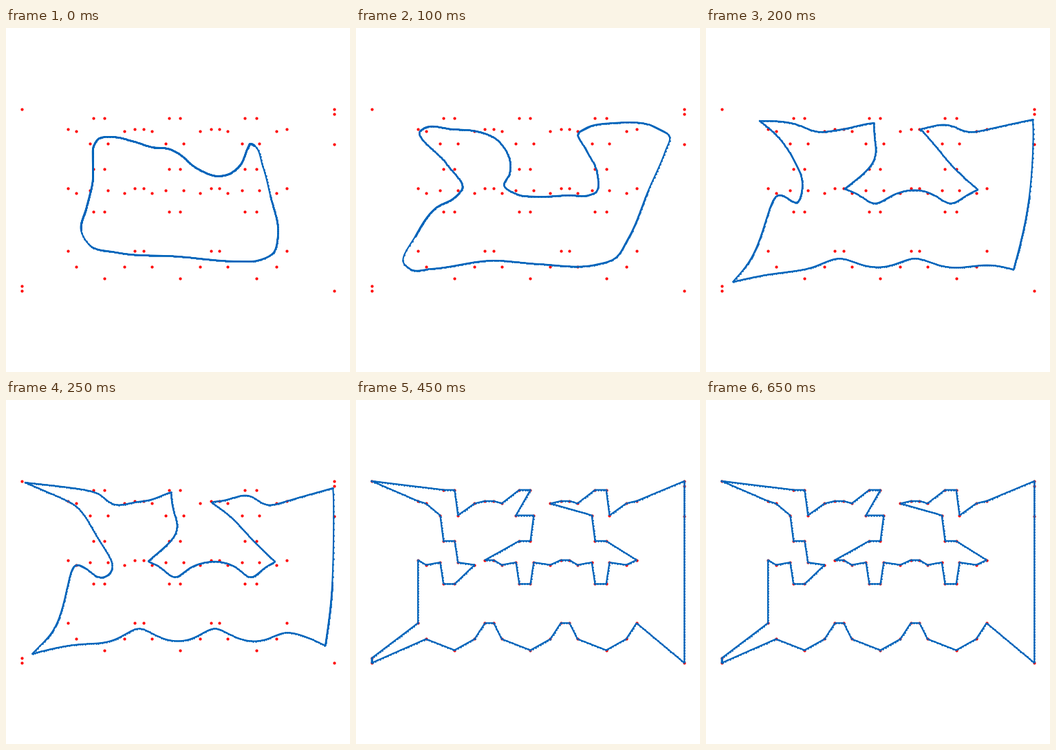
These frames come from a looping animation (500 by 500 pixels, 1.65 s). A matplotlib script:

```python
import numpy as np
import matplotlib.pyplot as plt
from matplotlib.animation import FuncAnimation

STEP_MS, FRAMES = 50, 33
PITCH = 110.16          # spacing of the three repeated city blocks
LEFT, RIGHT = 22.7, 477.3
TOP, BOTTOM = 117.8, 382.2
SUB = 32                # samples between neighbouring ring points

# One block of cities, keyed by letter.
COLS = [90, 101.6, 122.3, 127.1, 143.3, 148.1, 172.3, 187.4]
TOP_Y = [146.8, 150.3, 167.6, 130.6]
MID_Y = [232.6, 239.6, 236, 267.4]
LOW_Y = [324.2, 347.4, 363.6]
BLOCK = dict(zip("abcdefgh", zip(COLS, TOP_Y + [TOP_Y[i] for i in (3, 2, 1, 0)])))
BLOCK.update(zip("klmnopqr", zip(COLS, MID_Y + [MID_Y[i] for i in (3, 2, 1, 0)])))
BLOCK.update(zip("stuvw", zip([COLS[i] for i in (0, 1, 4, 6, 7)], LOW_Y + LOW_Y[1::-1])))
BLOCK.update(zip("ij", ((x, 204.8) for x in COLS[3:5])))

TR, R2, R3, BR = [(RIGHT, y) for y in (TOP, 124.8, 168.8, BOTTOM)]
TL, L2, BL = [(LEFT, y) for y in (TOP, 375.2, BOTTOM)]


def block(k, keys):
    """Cities of block k in the given order."""
    return [(BLOCK[c][0] + k * PITCH, BLOCK[c][1]) for c in keys]


# The ring is split into sections that correspond from pose to pose.
tour = [
    [TL] + block(0, "defgh") + block(1, "abd"),
    block(1, "ecfji"),
    block(0, "r") + block(1, "klmnopqr") + block(2, "klmnopq"),
    block(2, "rjic"),
    block(1, "gh") + block(2, "abdefgh"),
    [TR, R2],
    [R3],
    [BR] + block(2, "wvuts") + block(1, "wvuts") + block(0, "wvut"),
    [BL],
    [L2] + block(0, "s"),
    block(0, "klmno"),
    block(0, "qpjicba"),
]
cities = sum(tour, [])
PINNED = {0, 1, 2, 3, 4, 5, 7, 8}   # sections that start with a sharp corner

blob = [
    [(127, 172), (134, 161), (152, 158), (183, 164)],
    [(212, 173), (238, 176)],
    [(250, 182), (276, 203), (310, 215)],
    [(324, 212), (341, 198)],
    [(351, 175), (355, 168)],
    [(361, 171), (373, 200)],
    [(384, 243), (395, 303)],
    [(389, 326), (365, 338), (340, 339), (250, 332), (160, 326)],
    [(122, 316)],
    [(109, 294)],
    [(117, 260)],
    [(126, 220), (126, 190)],
]

fold = [
    [(94, 149), (98, 146), (140, 147), (183, 152)],
    [(203, 161), (224, 196), (223, 212)],
    [(215, 228), (235, 242), (260, 245), (310, 243), (338, 243)],
    [(348, 239), (350, 209), (333, 175)],
    [(323, 153), (333, 146), (375, 138), (435, 144)],
    [(456, 159), (450, 178)],
    [(425, 236), (396, 305)],
    [(376, 335), (348, 344), (265, 343), (198, 338), (110, 350), (80, 351)],
    [(70, 343)],
    [(86, 303)],
    [(118, 260), (141, 248)],
    [(154, 234), (132, 198)],
]

# Section starts of the smoothed tours; None keeps the city itself.
fins = [(78, 135), (244, 138), (201, 234), (395, 235), (314, 149), (475, 133),
        (476, 255), (447, 351), (39, 369), (50, 352), None, (132, 230)]
spikes = [(28, 120), (240, 134), (207, 234), (391, 235), (299, 149), (475, 128),
          (476, 280), (464, 357), (38, 369), (50, 354), None, None]
corners = [TL, None, None, None, None, (477, 122),
           None, (475, 376), BL, None, None, None]


def length(path):
    return np.hypot(*np.diff(np.array(path), axis=0).T).sum()


COUNTS = [int(length(sec + tour[(i + 1) % len(tour)][:1]) / 1.4) + 12
          for i, sec in enumerate(tour)]


def resample(path, count):
    """Evenly spaced points along a path, without its end."""
    dist = np.append(0, np.cumsum(np.hypot(*np.diff(path, axis=0).T)))
    at = np.linspace(0, dist[-1], count, endpoint=False)
    return np.column_stack([np.interp(at, dist, path[:, 0]), np.interp(at, dist, path[:, 1])])


def to_ring(curve, sections):
    curve = np.vstack([curve, curve[:1]])
    ends = np.cumsum([0] + [len(sec) for sec in sections]) * SUB
    return np.vstack([resample(curve[i:j + 1], n) for i, j, n in zip(ends, ends[1:], COUNTS)])


def spline(pose, soft=1.0):
    """Smooth closed ring through a pose; sharp turns stay sharp."""
    p = np.array(sum(pose, []), float)
    nxt = np.roll(p, -1, axis=0)
    d = np.linalg.norm(nxt - p, axis=1, keepdims=True)
    u = (nxt - p) / d
    u0, d0 = np.roll(u, 1, axis=0), np.roll(d, 1, axis=0)
    t = u0 / d0 + u / d
    t /= np.linalg.norm(t, axis=1, keepdims=True)
    t *= np.linalg.norm(u0 + u, axis=1, keepdims=True) / 2
    a = p + t * d * soft / 3
    b = nxt - np.roll(t, -1, axis=0) * d * soft / 3
    s = np.linspace(0, 1, SUB, endpoint=False)[:, None, None]
    curve = (1 - s)**3 * p + 3 * s * (1 - s)**2 * a + 3 * s**2 * (1 - s) * b + s**3 * nxt
    return to_ring(curve.swapaxes(0, 1).reshape(-1, 2), pose)


def relax(p, sigma):
    """Gaussian average along a run of cities with both ends held."""
    n = len(p) - 1
    gaps = np.where(np.hypot(*np.diff(p, axis=0).T) > 60, 1.8, 1.0)
    pos = np.append(0, np.cumsum(gaps))

    def mirror(v):
        return np.concatenate([2 * v[0] - v[:0:-1], v, 2 * v[-1] - v[-2::-1]])

    at = np.interp(np.arange(n * SUB) / SUB, np.arange(n + 1), pos)
    w = np.exp(-((at[:, None] - mirror(pos)) / sigma)**2 / 2)
    return w @ mirror(p) / w.sum(axis=1, keepdims=True)


def smoothed(starts, sigma):
    """The tour with moved section starts, relaxed between its pinned corners."""
    pts, pins = [], []
    for i, (sec, start) in enumerate(zip(tour, starts)):
        if i in PINNED:
            pins.append(len(pts))
        pts += [start or sec[0]] + sec[1:]
    pins.append(len(pts))
    p = np.array(pts + pts[:1], float)
    return to_ring(np.vstack([relax(p[i:j + 1], sigma) for i, j in zip(pins, pins[1:])]), tour)


KEYS = [0, 2, 4, 5, 7, 9]
RINGS = [spline(blob), spline(fold), smoothed(fins, 1.25), smoothed(spikes, 1.05),
         smoothed(corners, 0.58), spline(tour, 0)]


def ring_at(i):
    if i >= KEYS[-1]:
        ring = RINGS[-1]
    else:
        k = np.searchsorted(KEYS, i, side="right") - 1
        f = (i - KEYS[k]) / (KEYS[k + 1] - KEYS[k])
        ring = (1 - f) * RINGS[k] + f * RINGS[k + 1]
    return np.vstack([ring, ring[:1]])


fig = plt.figure(figsize=(5, 5), dpi=100, facecolor="white")
ax = fig.add_axes([0, 0, 1, 1])
ax.set(xlim=(0, 500), ylim=(500, 0))
ax.axis("off")
ax.scatter(*zip(*cities), color="red", s=4, zorder=1)
line, = ax.plot([], [], color="#0063ba", lw=1.5, marker=".", ms=2, markevery=3, zorder=2)


def update(i):
    line.set_data(*ring_at(i).T)
    return line,


anim = FuncAnimation(fig, update, frames=FRAMES, interval=STEP_MS, repeat=True, repeat_delay=0)
plt.show()
```
